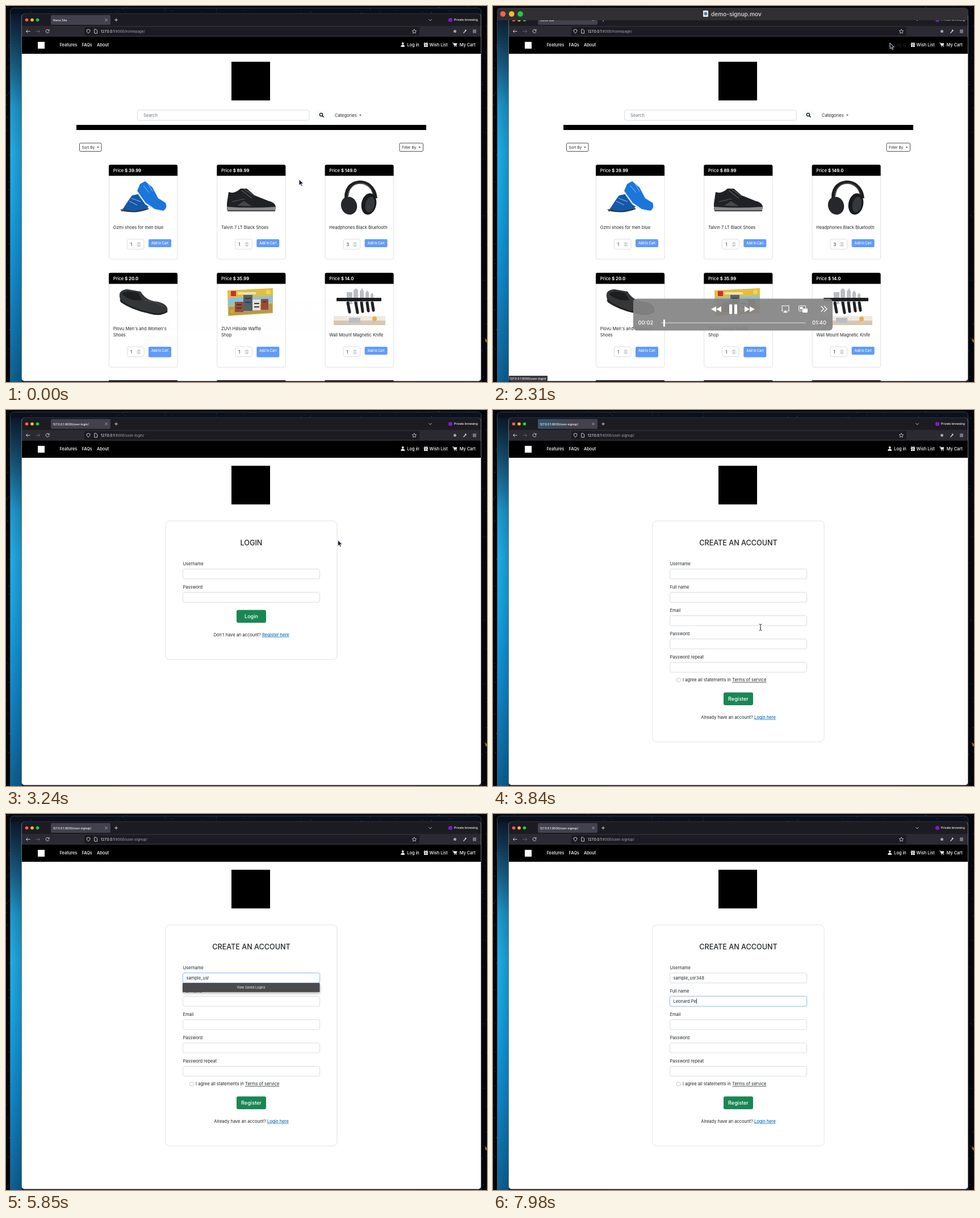
Animation, 847 px wide and 661 px high, one loop 8 s. Source, as an HTML page:

```html
<!DOCTYPE html>
<html lang="en">
<head>
<meta charset="utf-8">
<title>Shop sign-up demo</title>
<style>
html, body { margin: 0; width: 100%; height: 100%; overflow: hidden; background: #000; }
svg { display: block; font-family: Inter, "Open Sans", sans-serif; }
text { white-space: pre; }
</style>
</head>
<body>
<svg id="stage" width="847" height="661" viewBox="0 0 847 661"></svg>
<script>
const HOST = '127.0.0.1:8000/';
const LOGIN_AT = 2940, SIGNUP_AT = 3750, FOCUS_AT = 4620, TAB_AT = 6480, NAME_AT = 6780;

// Markup helpers; text is placed by its vertical centre.
const text = (x, y, s, size = 7.5, fill = '#212529', attrs = '') =>
  `<text x="${x}" y="${y + size * .36}" font-size="${size}" fill="${fill}" ${attrs}>${s}</text>`;
const rect = (x, y, w, h, fill, r = 0, attrs = '') =>
  `<rect x="${x}" y="${y}" width="${w}" height="${h}" rx="${r}" fill="${fill}" ${attrs}/>`;
const path = (d, fill, attrs = '') => `<path d="${d}" fill="${fill}" ${attrs}/>`;
const line = (d, color, w = 1, attrs = '') => path(d, 'none', `stroke="${color}" stroke-width="${w}" ${attrs}`);
const circle = (x, y, r, fill, attrs = '') => `<circle cx="${x}" cy="${y}" r="${r}" fill="${fill}" ${attrs}/>`;
const group = (id, content) => `<g id="${id}">${content}</g>`;
const MEDIUM = 'font-weight="500" ', BOLD = 'font-weight="600" ', MIDDLE = 'text-anchor="middle" ';
const lights = (x, y, gap, r) =>
  ['#ff5f57', '#febc2e', '#28c840'].map((c, i) => circle(x + i * gap, y, r, c)).join('');
const caretDown = (x, y) => path(`M${x - 1.8} ${y - 1}h3.6l-1.8 2z`, '#212529');
const box = (x, y, w, h, r = 3, stroke = '#ced4da') => rect(x, y, w, h, '#fff', r, `stroke="${stroke}" stroke-width=".8"`);

function desktop() {
  let seed = 7, stars = '';
  const random = () => (seed = seed * 16807 % 2147483647) / 2147483647;
  for (let i = 0; i < 140; i++) {
    const side = i % 3, x = side == 0 ? random() * 7 : side == 1 ? 837 + random() * 10 : random() * 847;
    const y = side == 2 ? random() * 13 : random() * 661;
    stars += circle(x, y, .3 + random() * .5, i % 4 ? '#465064' : '#6c614a', 'opacity=".7"');
  }
  const sky = ['#0c1a2c', '#17597f', '#1f9bd0', '#1fb0ea', '#18a9e8', '#129ade', '#1189cb', '#0f76b2', '#0e6296']
    .map((c, i) => `<stop offset="${i / 8}" stop-color="${c}"/>`).join('');
  return `<defs><linearGradient id="sky" x2="0" y2="1">${sky}</linearGradient>
    <linearGradient id="shade"><stop stop-color="#000" stop-opacity="0"/><stop offset="1" stop-color="#001020" stop-opacity=".2"/></linearGradient>
    <linearGradient id="glow"><stop stop-color="#34566c"/><stop offset="1" stop-color="#42414d"/></linearGradient>
    <filter id="soft" x="-10%" y="-30%" width="120%" height="170%"><feDropShadow dx="0" dy="2" stdDeviation="2" flood-opacity=".35"/></filter></defs>`
    + rect(0, 0, 847, 661, '#04060c') + rect(7, 4, 829, 660, '#0a111e', 6) + rect(7, 14, 21, 650, 'url(#sky)')
    + rect(7, 14, 21, 650, 'url(#shade)') + stars + path('M843 584l4 3v5l-3-2z', '#9a6412')
    + rect(200, 659, 520, 2, '#22102c') + rect(7.5, 3.5, 829, 664, 'none', 6, 'stroke="#4a4f56" stroke-width=".8"');
}

function browser() {
  const person = circle(698.7, 65.8, 1.9, '#fff') + path('M695.2 71.8q0-3.6 3.5-3.6t3.5 3.6z', '#fff');
  const gift = path('M735.7 66h7.4v2h-7.4zM736.2 68.6h6.4v3.4h-6.4z', '#fff')
    + line('M739.4 66v6', '#000', .7) + line('M739.4 65.6q-3-2.6-2.6-.6t2.6.6q3-2.6 2.6-.6t-2.6.6', '#fff', .8);
  const cart = line('M786 64.8h1.8l1.5 4.8h4.4', '#fff', .9) + path('M788 65.6h6.4l-1 3.2h-4.4z', '#fff')
    + circle(789.8, 71.2, .8, '#fff') + circle(793, 71.2, .8, '#fff');
  const link = (x, s) => text(x, 68, s, 7.4, '#fff', MEDIUM);
  const ink = '#dcdce2';
  return rect(27.5, 14, 809, 645.5, '#fff', 5, 'stroke="#62646a" stroke-width=".8"')
    + path('M28 54V19q0-5 5-5h798q5 0 5 5v35z', '#1c1b22') + rect(28, 35, 808, 19, '#2b2a33')
    + lights(36.5, 24.5, 9.5, 2.8) + rect(79, 16, 105, 17, '#42414d', 2)
    + group('burst', rect(79, 16, 58, 17, 'url(#glow)', 2))
    + group('tabTitle', '') + line('M174.5 22.5l4 4m0-4l-4 4', ink, .7) + line('M191 24.5h6m-3-3v6', ink, .9)
    + line('M744.5 23.3l2.5 2.5 2.5-2.5', ink, .9) + circle(782.5, 24.5, 3.6, '#7a1fc2')
    + text(789, 24.5, 'Private browsing', 5.2, '#fff', MEDIUM)
    + rect(138, 37, 590, 15, '#1c1b22', 2)
    + line('M42.5 44.5h-7m2.8-2.8l-2.8 2.8 2.8 2.8', ink, .9) + line('M52.5 44.5h7m-2.8-2.8l2.8 2.8-2.8 2.8', '#686773', .9)
    + line('M75.5 42.5a3 3 0 1 0 .5 2.4m0-4v2.4h-2.4', ink, .9)
    + line('M145 41l3 1.2q0 4-3 5.8-3-1.8-3-5.8z', ink, .9) + line('M155.8 41h2.8l2 2v5h-4.8z', ink, .9)
    + group('url', '')
    + line('M719 40.8l1.1 2.4 2.6.3-1.9 1.8.5 2.6-2.3-1.3-2.3 1.3.5-2.6-1.9-1.8 2.6-.3z', ink, .8)
    + circle(790.5, 44.5, 2.5, '#a5a5ad') + line('M805.5 47.5l4-4', ink, 1.3) + line('M809.2 41.4l-.4 2.2 2.2-.4', ink, 1.2)
    + line('M822 42.3h6m-6 2.2h6m-6 2.2h6', ink, .9)
    + rect(28, 54, 808, 30, '#000') + rect(56, 63, 12, 12, '#fff')
    + link(94.5, 'Features') + link(133.5, 'FAQs') + link(160, 'About')
    + group('loginLink', person + link(706.3, 'Log in'))
    + gift + link(745.5, 'Wish List') + cart + link(798.7, 'My Cart')
    + rect(397, 98, 68, 68, '#000');
}

const pictures = [
  path('M205 358q10-16 17-25l14-3 15 23q-8 10-34 9z', '#1558a8') + line('M203 359q26 6 48-3', '#26323e', 2)
    + path('M231 325l5-12 9-5 13 11 10 19 13 8q4 9-4 14l-15-3-17-12z', '#1b76dc')
    + line('M231 327l15 21 15 10 16 3', '#e6edf5', 2.2) + line('M242 316l10 12m-2-16l8 14m-37 12l16 6m-20-1l14 7', '#8ec2f5', 1)
    + line('M201 358l10-2m-8 5l9-3', '#333', .8),
  path('M389 347l3-20q10 4 21-6h11l14 12 25 10q13 3 12 13l-86 2z', '#202124')
    + path('M389 353q43 3 86 0l-1 8h-84z', '#8c8d90') + line('M390 360h84', '#2b2b2d', 1.4)
    + line('M415 324l18 14m-15-17l20 13m-40 10l22-5', '#5a5b5f', 1.2) + path('M407 351l12-8 14 9z', '#47484b'),
  line('M600 344c-9-42 47-47 51-6', '#1e1f21', 6) + line('M603 334c0-28 38-30 43-3', '#55585c', 1.5)
    + `<ellipse cx="604" cy="351" rx="14" ry="16" fill="#25272a" transform="rotate(-18 604 351)"/>
       <ellipse cx="639" cy="348" rx="13" ry="19" fill="#191a1c" transform="rotate(12 639 348)"/>
       <ellipse cx="641" cy="349" rx="8" ry="14" fill="#35383c" transform="rotate(12 641 349)"/>`,
  path('M200 511q-2-12 14-13l23 4q10 17 31 18 19 5 16 17-12 11-34 3-29-6-48-19z', '#343638')
    + path('M204 506q6-7 28-2l8 13q-22 3-36-11z', '#1d1e20') + line('M201 517q20 16 50 22 20 6 33-2', '#202123', 2.5)
    + line('M244 517q20 3 34 11', '#505356', 1),
  path('M390 500l80-4v44l-79 5z', '#e2bd45') + path('M391 513l79-4v12l-79 6z', '#8fc2d5')
    + path('M392 529l77-6v16l-77 5z', '#b59a55') + rect(396, 501, 9, 9, '#c8322c')
    + path('M403 520h15v18h-15zM449 515h13v19h-13z', '#9b4b36') + path('M418 508h16v28h-16z', '#55616c')
    + path('M434 516h14v19h-14z', '#e9e2d2') + line('M406 525h9m-9 6h9m6-17h10m-10 7h10m6 2h9m-9 6h9m6-9h7', '#2d3d4d', 2)
    + circle(462, 503, 4, '#f5d64c') + rect(408, 503, 32, 4, '#eee2b0') + circle(398, 537, 3, '#d6ae21'),
  rect(577, 545, 91, 16, '#efe9e0') + path('M577 553h91v8h-91z', '#d6c7b4') + rect(604, 548, 20, 9, '#b9bec2') + circle(649, 550, 4, '#e9ae48')
    + path('M600 503h10v21h-10zM612 522v-22q4-7 8 0v22zM623 522v-20l4-6 3 6v20zM633 522v-18l3-4 3 4v18zM642 522v-14l3-4 2 4v14z', '#b8bdc1')
    + rect(582, 513, 79, 6, '#1d1e20', 1) + line('M602 522l3 16m11-16l3 17m7-17l2 15m8-15l2 14m7-14l2 13', '#202123', 5, 'stroke-linecap="round"')
];

const products = [
  ['39.99', 1, 'Ozmi shoes for men blue'],
  ['89.99', 1, 'Talvin 7 LT Black Shoes'],
  ['149.0', 3, 'Headphones Black Bluetooth'],
  ['20.0', 1, "Plovu Men's and Women's", 'Shoes'],
  ['35.99', 1, 'ZUVI Hillside Waffle', 'Shop'],
  ['14.0', 1, 'Wall Mount Magnetic Knife']
];

function card([price, count, title, more], i) {
  const x = 181 + i % 3 * 190.3, y = i < 3 ? 279 : 469, controls = y + (i < 3 ? 131 : 130);
  const titleY = i < 3 ? 389 : more ? 567 : 578;
  return box(x + .4, y + .4, 120.6, 165.6, 3, '#d8d8d8') + path(`M${x} ${y + 19.5}v-16.5q0-3 3-3h115q3 0 3 3v16.5z`, '#000')
    + text(x + 7.7, y + 9.8, `Price <tspan font-weight="700">$ ${price}</tspan>`, 7.6, '#fff', MEDIUM)
    + pictures[i] + text(x + 7.7, titleY, title) + (more ? text(x + 7.7, titleY + 11, more) : '')
    + box(x + 32.5, controls, 29.5, 17.5) + text(x + 38, controls + 9, count)
    + rect(x + 49, controls + 4.5, 7.5, 9, '#ececec', 2)
    + line(`M${x + 51.3} ${controls + 7.7}l1.5-1.5 1.5 1.5m-3 2.7l1.5 1.5 1.5-1.5`, '#666', .7)
    + rect(x + 70, controls, 40, more ? 18.5 : 14, '#609bf8', 2)
    + text(x + 90, controls + 6.6, 'Add to Cart', 5.5, '#fff', MEDIUM + MIDDLE);
}

function homePage() {
  return box(231.5, 183, 302.5, 18) + text(242, 192, 'Search', 7.5, '#6c757d')
    + rect(545, 183, 21, 18, '#f8fcfc', 3) + circle(555, 191, 2.6, 'none', 'stroke="#000" stroke-width="1.2"')
    + line('M557 193l2.5 2.5', '#000', 1.4)
    + text(579, 192, 'Categories') + caretDown(624, 192) + rect(124, 209, 616, 9, '#000')
    + box(129.5, 241, 38.5, 14.5, 2, '#212529') + text(133.5, 248.5, 'Sort By', 6.6) + caretDown(162, 248.5)
    + box(693, 241, 41.5, 14.5, 2, '#212529') + text(697, 248.5, 'Filter By', 6.6) + caretDown(728.5, 248.5)
    + products.map(card).join('') + [181, 371.3, 561.6].map(x => rect(x, 658, 121, 1.5, '#000')).join('');
}

function formPage(heading, labels, terms, action, question, answer) {
  const end = 288 + (labels.length - 1) * 41, button = end + (terms ? 56 : 34), linkY = button + 32;
  return box(281, 195, 302, linkY + 43.5 - 195, 7, '#d9dcdf') + text(432, 233.5, heading, 12.6, '#212529', MEDIUM + MIDDLE)
    + labels.map((s, i) => text(311.5, 270 + i * 41, s) + box(311.5, 279.5 + i * 41, 241, 17.5)).join('')
    + (terms ? box(323.5, 471.3, 6.5, 6.5, 1.5, '#b5b9bd')
      + text(334, 474.7, 'I agree all statements in <tspan text-decoration="underline">Terms of service</tspan>', 7.6) : '')
    + rect(406, button - 11.5, 52, 22.5, '#198754', 3) + text(432, button, action, 9.1, '#fff', MEDIUM + MIDDLE)
    + text(432, linkY, `${question} <tspan fill="#0b6fc0" font-weight="500" text-decoration="underline">${answer}</tspan>`, 7.5, '#212529', MIDDLE);
}

const suggestions = ['Ona Qe', 'Pavel Ostrimo', 'Tomas', 'fdsfsd', 'Maren Dovu', 'Leopold'];

function player() {
  const white = '#fff', back = 'M402 528v10l-9-5zM393 528v10l-9-5z', forward = 'M443 528v10l9-5zM452 528v10l9-5z';
  return path('M7 25V9q0-6 6-6h817q6 0 6 6v16z', '#303033') + lights(17.5, 14, 15.3, 4.8)
    + rect(370, 8, 9, 11, '#e9edf0', 1) + circle(374.5, 13.5, 3, '#4b83a8')
    + text(384, 14, 'demo-signup.mov', 10, '#c9c9cb', BOLD)
    + rect(247, 514.5, 351, 56, '#858585', 6, 'opacity=".93"')
    + path(back + forward, white) + group('play', path('M415.5 524v18.5l16-9.25z', white))
    + group('pause', rect(416, 524.5, 5, 17, white, 1) + rect(425, 524.5, 5, 17, white, 1))
    + line('M511.5 536h-2.5v-9h12v9h-2.5', white, 1.1) + path('M511 539l4-4.5 4 4.5z', white)
    + rect(538.5, 527, 12, 9, 'none', 1, 'stroke="#fff"') + rect(540.5, 529, 5, 4, white) + rect(545, 532, 9, 7, white, 1)
    + line('M577.5 527.5l5 5-5 5m5.5-10l5 5-5 5', white, 1.2)
    + text(255.5, 557, '', 9.4, white, MEDIUM + 'id="clock"') + text(562, 557, '01:40', 9.4, white, MEDIUM)
    + rect(296, 556, 255, 2, '#b9b9b9', 1) + group('knob', rect(294.5, 551, 3, 13, white, 1.5))
    + group('scan', circle(819, 655, 9.5, '#47484b')
      + line('M814 653v-3h3m4 0h3v3m0 4v3h-3m-4 0h-3v-3m2.5-4h5m-5 2h5m-5 2h3', '#e4e4e4', .9));
}

const stage = document.getElementById('stage');
stage.innerHTML = desktop() + browser()
  + group('home', homePage())
  + group('login', formPage('LOGIN', ['Username', 'Password'], false, 'Login', "Don't have an account?", 'Register here'))
  + group('signup', formPage('CREATE AN ACCOUNT', ['Username', 'Full name', 'Email', 'Password', 'Password repeat'],
      true, 'Register', 'Already have an account?', 'Login here')
    + group('focus', rect(310.5, 278.5, 243, 19.5, '#d3e4fd', 4) + rect(311.5, 279.5, 241, 17.5, '#fff', 3, 'stroke="#93bff8" stroke-width=".9"'))
    + text(317.5, 288.3, '', 7.5, '#212529', 'id="userText"') + text(317.5, 329.3, '', 7.5, '#212529', 'id="nameText"')
    + group('caret', rect(0, -4.5, .8, 9, '#111'))
    + group('saved', rect(311, 297, 241.5, 16, '#4c4c4e', 1, 'filter="url(#soft)"') + text(431.5, 305.3, 'View Saved Logins', 5.6, '#f2f2f4', MIDDLE))
    + group('names', rect(311, 338, 241.5, 58, '#1c1c1e', 1, 'filter="url(#soft)"')
      + suggestions.map((s, i) => text(314, 343.3 + i * 9.5, s, 5.7, '#f2f2f4', MEDIUM)).join('')))
  + group('status', rect(28, 650, 68, 9.5, '#38373f', 1) + text(29.5, 655, '', 5.2, '#fff', MEDIUM + 'id="statusText"'))
  + group('arrow', path('M0 0v10.3l2.5-2.2 1.7 3.8 1.7-.8-1.7-3.7 3.4-.3z', '#182235', 'stroke="#e8ebf2" stroke-width=".8"'))
  + group('beam', line('M-2.5-5.5q2.5 0 2.5 1.5 0-1.5 2.5-1.5M0-4v8M-2.5 5.5q2.5 0 2.5-1.5 0 1.5 2.5 1.5M-1 1h2', '#333', 1))
  + group('player', player());

const el = Object.fromEntries([...stage.querySelectorAll('[id]')].map(e => [e.id, e]));
const show = (id, on) => el[id].style.display = on ? '' : 'none';
const move = (id, x, y) => el[id].setAttribute('transform', `translate(${x} ${y})`);
const clamp = v => Math.max(0, Math.min(1, v));
const between = (t, a, b) => t >= a && t < b;
const typed = (s, t, start, step) => s.slice(0, Math.max(0, Math.floor((t - start) / step)));

// Pointer stops: time, x, y
const stops = [[0, 516, 305], [1350, 516, 305], [2300, 699, 65], [2980, 699, 65], [3500, 471, 391], [3720, 471, 391],
  [3830, 471, 382], [3950, 471, 382], [4500, 440, 290], [6440, 440, 290], [6640, 262.5, 326], [8000, 262.5, 326]];

function pointer(t) {
  const i = stops.findIndex(s => s[0] > t), [t0, x0, y0] = stops[i - 1], [t1, x1, y1] = stops[i];
  const k = (t - t0) / (t1 - t0), e = k * k * (3 - 2 * k);
  return [x0 + (x1 - x0) * e, y0 + (y1 - y0) * e];
}

function draw(t) {
  const page = t < LOGIN_AT ? 'home' : t < SIGNUP_AT ? 'login' : 'signup';
  const route = { home: 'homepage/', login: 'user-login/', signup: 'user-signup/' }[page];
  for (const id of ['home', 'login', 'signup']) show(id, id == page);
  el.url.innerHTML = text(167, 44.5, `127.0.0.1<tspan fill="#a7a7af">:8000/${route}</tspan>`, 6.3, '#fff');
  const loading = between(t, 2700, LOGIN_AT) || between(t, 3650, SIGNUP_AT);
  el.tabTitle.innerHTML = text(loading ? 92 : 82.5, 24.7, page == 'home' ? 'Home Site' : HOST + route, 5.1, '#fff', MEDIUM)
    + (loading ? circle(83.5 + Math.sin(t / 90), 24.5, .8, '#aaa') : '');
  show('burst', between(t, SIGNUP_AT, 3950));
  el.loginLink.style.opacity = between(t, 2270, 3020) ? .13 : 1;

  show('status', between(t, 2300, LOGIN_AT) || between(t, 3480, SIGNUP_AT));
  el.statusText.textContent = HOST + (t < LOGIN_AT ? 'user-login/' : 'user-signup/');

  const [x, y] = pointer(t), hidden = between(t, 4940, 6440) || t >= NAME_AT;
  const beam = between(t, 3810, 4940);
  show('arrow', !hidden && !beam);
  show('beam', !hidden && beam);
  move('arrow', x, y);
  move('beam', x, y);

  const onName = t >= TAB_AT, field = onName ? el.nameText : el.userText;
  el.userText.textContent = typed('sample_usr', t, 4850, 90) + typed('348', t, 5950, 120);
  el.nameText.textContent = typed('Leonard Pe', t, NAME_AT - 130, 130);
  show('focus', t >= FOCUS_AT);
  move('focus', 0, onName ? 41 : 0);
  show('saved', between(t, FOCUS_AT, TAB_AT));
  show('names', between(t, TAB_AT + 90, NAME_AT));
  show('caret', t >= FOCUS_AT && !between(t, 5800, 5940));
  if (page == 'signup') move('caret', 317.8 + (field.textContent ? field.getComputedTextLength() : 0), onName ? 329 : 288);

  const seconds = Math.max(0, t - 1200) / 520;
  el.player.style.opacity = Math.min(clamp(t / 240), clamp((2830 - t) / 330));
  el.clock.textContent = '00:0' + Math.min(9, Math.floor(seconds));
  move('knob', seconds * 2.55, 0);
  show('play', t < 1200);
  show('pause', t >= 1200);
  show('scan', t < 1230);
}

const begin = performance.now();
function tick() {
  draw((performance.now() - begin) % 8000);
  requestAnimationFrame(tick);
}
tick();
</script>
</body>
</html>
```
